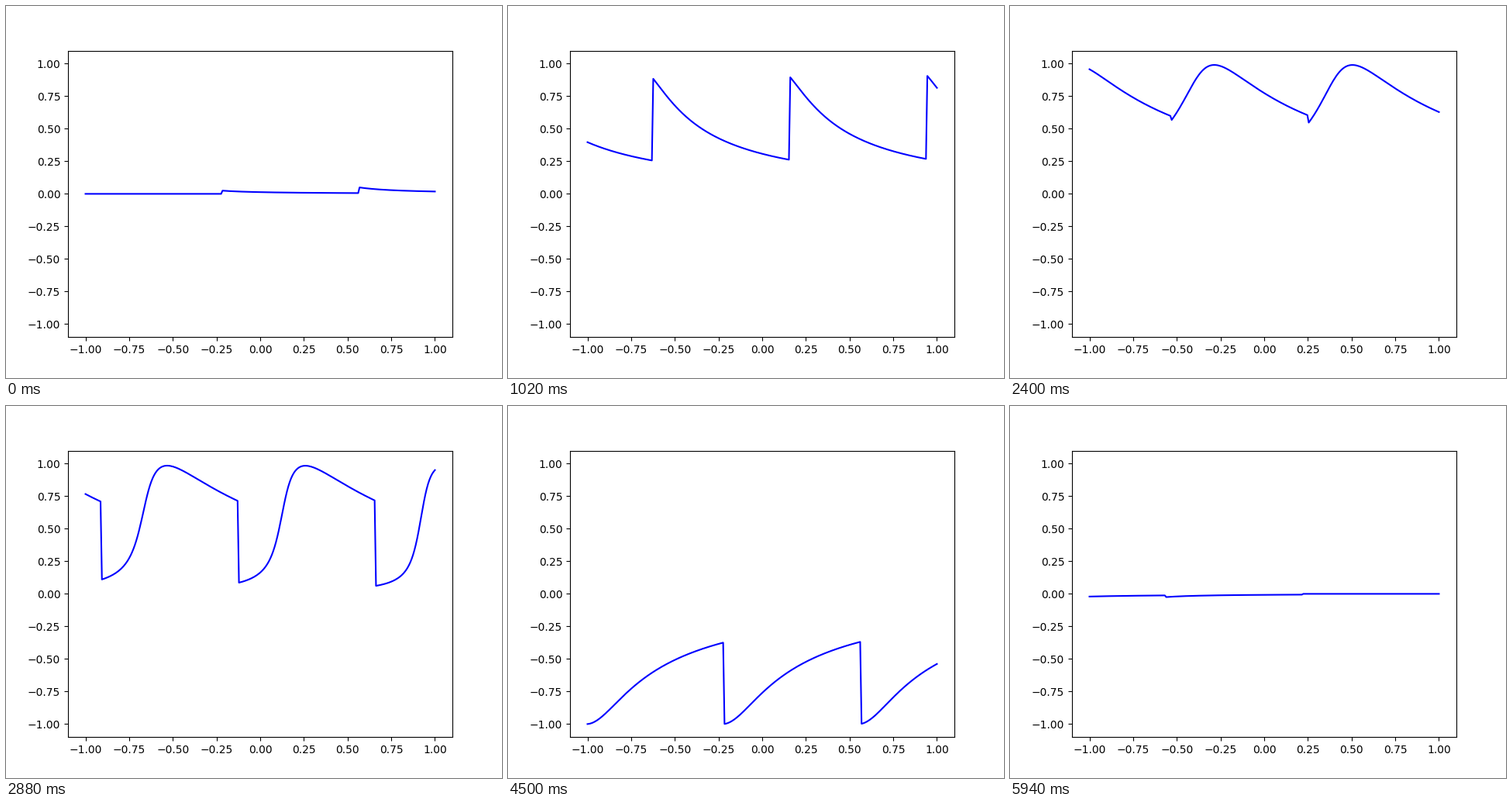
Write a matplotlib script that moves like this. It is 640x480 px and loops after 6 s.

```python
import numpy as np
import matplotlib.pyplot as plt
from matplotlib.animation import FuncAnimation

N_X, N_T = 256, 100
NU = 0.01 / np.pi


def burgers(x, t):
    """Cole-Hopf solution of the Burgers equation with u(x, 0) = -sin(pi x)."""
    z = np.linspace(-12, 12, 481)
    y = x[:, None] - np.sqrt(4 * NU * t) * z
    log_w = -np.cos(np.pi * y) / (2 * np.pi * NU) - z**2
    w = np.exp(log_w - log_w.max(axis=1, keepdims=True))
    return -(np.sin(np.pi * y) * w).sum(axis=1) / w.sum(axis=1)


x = np.linspace(-1, 1, N_X)
times = np.arange(N_T) / N_T
u = np.stack([burgers(x, t) for t in times], axis=1)

# Each row strings together the time histories of neighbouring points.
rows = u.reshape(N_T, N_X)

fig, ax = plt.subplots(figsize=(6.4, 4.8), dpi=100)
line, = ax.plot(x, rows[0], "b-", lw=1.5)
ax.set_xlim(-1.1, 1.1)
ax.set_ylim(-1.1, 1.1)


def update(i):
    line.set_ydata(rows[i])
    return line,


anim = FuncAnimation(fig, update, frames=N_T, interval=60, repeat=True,
                     repeat_delay=0)
plt.show()
```
